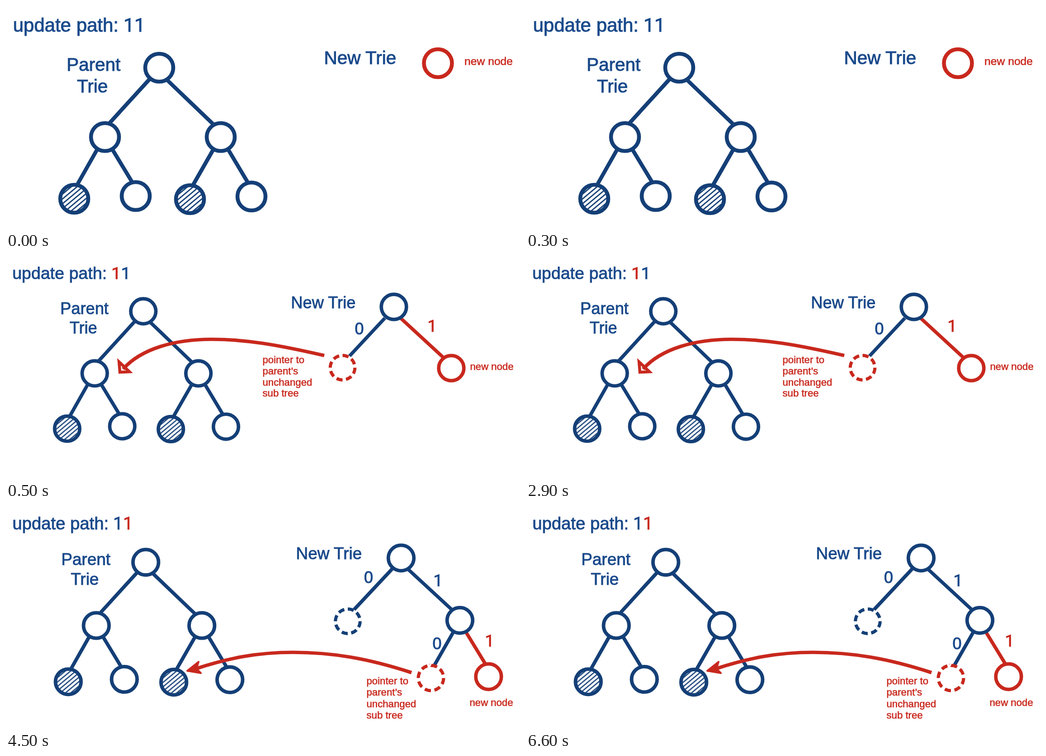
An HTML page that plays this animation: 1137x493 px, repeating every 8 s.

```html
<!DOCTYPE html>
<html lang="en">
<head>
<meta charset="utf-8">
<title>Trie update</title>
<style>
  html, body { margin: 0; width: 100%; height: 100%; overflow: hidden; background: #fff; }
  svg { display: block; }
  circle, path { fill: none; stroke: currentColor; }
  circle { fill: #fff; }
  svg { color: #143f77; }
  .red { color: #c8281d; }
  text { fill: #1a4a8b; stroke: #1a4a8b; stroke-width: 1; font-family: "Liberation Sans", Arial, sans-serif; }
  text.red, .red text, tspan.red { fill: #c8281d; stroke: #c8281d; }
  .one { font-family: Roboto, sans-serif; }
  .label { font-size: 36px; }
  .note { font-size: 22.2px; stroke-width: .6; }
  .dash { stroke-dasharray: .64 .36; stroke-width: 7; }
  .hatch { fill: url(#hatch); }
  .solid { fill: currentColor; stroke-width: 4; stroke-linejoin: round; }
</style>
</head>
<body>
<svg width="1137" height="493" viewBox="0 0 1137 493">
  <defs>
    <pattern id="hatch" y="-4.1" width="8.2" height="8.2" patternUnits="userSpaceOnUse" patternTransform="rotate(-40)">
      <path d="M0 4.1H9" stroke-width="2.8"/>
    </pattern>
  </defs>

  <g id="base" stroke-width="8.6" font-size="40.5">
    <text x="15.5" y="57" font-size="42">update path: <tspan class="one" x="260">1</tspan><tspan class="one" x="284">1</tspan></text>
    <text x="134" y="144">Parent</text>
    <text x="157" y="192">Trie</text>
    <text x="703.5" y="129">New Trie</text>
    <path d="M318 162L229 260M356 164L460 264M202 318L158 396M235 318L279 391M459 318L414 397M491 318L535 392"/>
    <circle cx="339" cy="137" r="31"/>
    <circle cx="219" cy="291" r="31"/>
    <circle cx="475" cy="291" r="31"/>
    <circle transform="translate(151 428)" r="31" class="hatch"/>
    <circle cx="287" cy="422" r="31"/>
    <circle transform="translate(407 429)" r="31" class="hatch"/>
    <circle cx="543" cy="423" r="31"/>
  </g>

  <g class="scene red" stroke-width="8.6">
    <circle cx="955.5" cy="127" r="31"/>
    <text class="note" x="1014" y="131" style="font-size: 24.7px">new node</text>
  </g>

  <g class="scene" stroke-width="7.7">
    <path d="M838 138L760 222"/>
    <path class="red" d="M873 138L967 225"/>
    <circle cx="858" cy="113" r="27.8"/>
    <text class="label" x="771.5" y="174">0</text>
    <g class="red">
      <circle class="dash" cx="744.5" cy="248" r="27.3" pathLength="8"/>
      <circle cx="985" cy="249" r="27.8"/>
      <text class="label one" x="932.5" y="168">1</text>
      <path d="M704 221C600 197 530 185 455 185C375 185 300 205 259 251"/>
      <path d="M250 235L252 258L273 257Z" stroke-width="6.5"/>
      <text class="note" x="1026.5" y="253">new node</text>
      <text class="note"><tspan x="567.5" y="238">pointer to</tspan><tspan x="567.5" y="263">parent’s</tspan><tspan x="567.5" y="288">unchanged</tspan><tspan x="567.5" y="312">sub tree</tspan></text>
    </g>
  </g>

  <g class="scene" stroke-width="7.7">
    <path d="M854 140L770 230M890 141L986 230M989 281L948 353"/>
    <path class="red" d="M1018 281L1060 350"/>
    <circle cx="874" cy="115.5" r="28.3"/>
    <circle cx="1004" cy="254" r="28.3"/>
    <circle class="dash" cx="756" cy="256" r="27.3" pathLength="8"/>
    <text class="label" x="792" y="171">0</text>
    <text class="label one" x="945.5" y="178">1</text>
    <text class="label" x="943.5" y="318">0</text>
    <g class="red">
      <circle class="dash" cx="940" cy="382" r="28" pathLength="8"/>
      <circle cx="1067.5" cy="379" r="28.3"/>
      <text class="label one" x="1059.5" y="312">1</text>
      <path d="M897 370C800 338 720 325 635 325C555 325 490 338 418 362"/>
      <path class="solid" d="M401 366L426 346L421 361L431 371Z"/>
      <text class="note" x="1025.5" y="444">new node</text>
      <text class="note"><tspan x="797.5" y="396">pointer to</tspan><tspan x="797.5" y="421">parent’s</tspan><tspan x="797.5" y="447">unchanged</tspan><tspan x="797.5" y="472">sub tree</tspan></text>
    </g>
  </g>
</svg>
<script>
  const base = document.getElementById('base');
  const digits = base.querySelectorAll('tspan');
  const scenes = document.querySelectorAll('.scene');
  const scales = [1, 0.896, 0.912];

  function show(step) {
    base.setAttribute('transform', `scale(${scales[step]})`);
    digits.forEach((d, i) => d.classList.toggle('red', i === step - 1));
    scenes.forEach((s, i) => s.style.display = i === step ? '' : 'none');
  }

  const start = performance.now();
  let shown = -1;
  function tick() {
    const t = (performance.now() - start) % 8000;
    const step = t < 500 ? 0 : t < 4500 ? 1 : 2;
    if (step !== shown) show(shown = step);
    requestAnimationFrame(tick);
  }
  tick();
</script>
</body>
</html>
```
